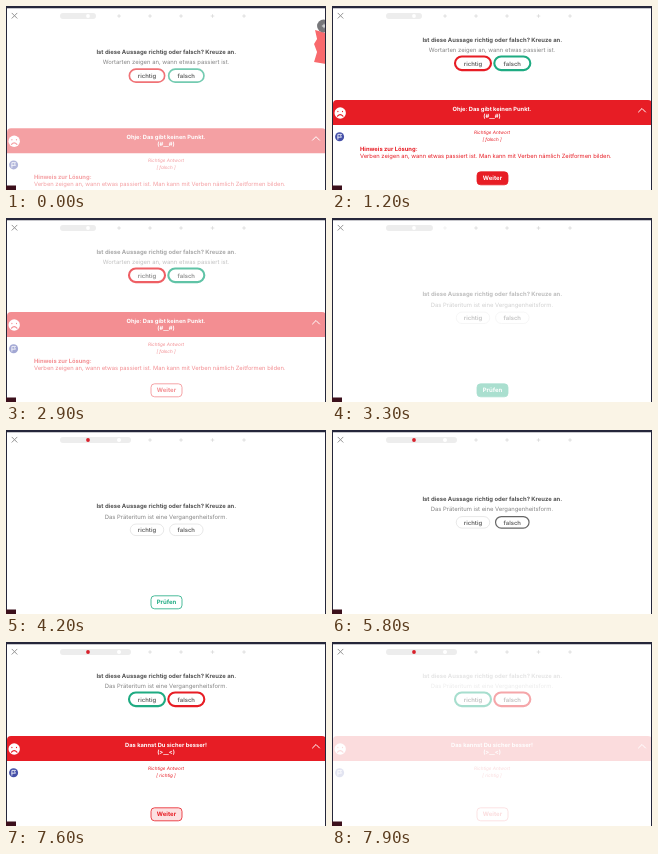
Animation of 320x184 px, one loop 8 s. Source, as an HTML page:

```html
<!DOCTYPE html>
<html lang="de">
<head>
<meta charset="utf-8">
<title>Quiz</title>
<style>
html, body { margin: 0; width: 100%; height: 100%; overflow: hidden; background: #fff; }
svg { display: block; width: 100vw; height: 100vh; }
text { font: 5.88px Inter, "Open Sans", sans-serif; text-rendering: geometricPrecision; text-anchor: middle; fill: #858585; }
.bold { font-weight: 700; font-size: 5.88px; fill: #505050; }
.label { font-weight: 600; font-size: 5.9px; fill: #626262; }
.title { font-weight: 700; font-size: 5.75px; }
.btn { font-weight: 700; font-size: 6px; }
.small { font-style: italic; font-size: 4.6px; }
.red { fill: #e71d25; }
.white { fill: #fff; }
.left { text-anchor: start; font-size: 5.8px; }
.line { fill: none; stroke-linecap: round; stroke-linejoin: round; }
</style>
</head>
<body>
<svg id="stage" viewBox="0 0 320 184"></svg>
<script>
const RED = '#e71d25', GREEN = '#1fab82', PALE = '#d8d8d8', LOOP = 8000;
const stage = document.getElementById('stage');
const $ = id => document.getElementById(id);
const set = (id, attrs) => { for (const k in attrs) $(id).setAttribute(k, attrs[k]); };
const ramp = (t, a, b) => Math.min(1, Math.max(0, (t - a) / (b - a)));
const mix = (a, b, p) => a + (b - a) * p;
const smooth = p => (1 - Math.cos(Math.PI * p)) / 2;

const text = (x, y, s, cls = '') => `<text x="${x}" y="${y}" class="${cls}">${s}</text>`;
const line = (d, color, w = 1) => `<path class="line" d="${d}" stroke="${color}" stroke-width="${w}"/>`;
const plus = (x, y, r, color) => line(`M${x - r} ${y}h${2 * r}M${x} ${y - r}v${2 * r}`, color, .8);
const button = (id, label) => `<g id="${id}">
  <rect id="${id}Box" x="145" y="165.8" width="31" height="13" rx="3.6"/>
  <text id="${id}Text" x="160.5" y="174.4" class="btn">${label}</text></g>`;
const pill = (id, x, label) => `<rect id="${id}" fill="#fff"/>` + text(x, 102, label, 'label');

const question = (n, sub) => `<g id="ask${n}">
  <g id="words${n}">${text(160.3, 78.2, 'Ist diese Aussage richtig oder falsch? Kreuze an.', 'bold')}
  ${text(160, 88.6, sub)}</g>
  <g id="pills${n}">${pill('yes' + n, 141, 'richtig')}${pill('no' + n, 180.3, 'falsch')}</g></g>`;

const panel = (n, title, face, answer, hint) => `<g id="panel${n}">
  <rect x="1" y="112" width="319" height="90" fill="#fff"/>
  <path d="M1 119V98q0-4 4-4H316q4 0 4 4V119Z" fill="${RED}"/>
  ${text(160, 105.2, title, 'title white')}${text(160, 112.2, face, 'title white')}
  <circle cx="8.2" cy="107" r="5.7" fill="#fff"/>
  ${line('M5.5 110.2q2.7-3 5.4 0M5.9 105.4v.2M10.5 105.4v.2', RED, 1.2)}
  ${line('M306.5 106l3.5-3.5 3.5 3.5', '#fff')}
  <circle cx="7.6" cy="130.7" r="4.5" fill="#4550a8"/>
  ${line('M5.9 133.2v-4.8h3.6l-1 1.4 1 1.4h-3.6', '#fff', .8)}
  ${text(160, 127.5, 'Richtige Antwort', 'small red')}${text(160, 134.5, `[ ${answer} ]`, 'small red')}
  ${hint ? text(28, 144.7, 'Hinweis zur Lösung:', 'title red left') + text(28, 152, hint, 'red left') : ''}
  ${button('next' + n, 'Weiter')}</g>`;

stage.innerHTML = `<rect width="320" height="184" fill="#fff"/>
  ${line('M6 7.2l5 5M11 7.2l-5 5', '#959595', 1)}
  <rect id="bar" x="54" y="7" height="6" rx="3" fill="#ededed"/>
  <circle id="dot" cx="82" cy="10" r="1.9"/>
  <g id="plus">${plus(113, 10, 1.4, PALE)}</g><circle id="nextDot" cx="113" cy="10" r="2" fill="#fff"/>
  ${[144, 175, 206.5, 238].map(x => plus(x, 10, 1.4, PALE)).join('')}
  ${question(1, 'Wortarten zeigen an, wann etwas passiert ist.')}
  ${question(2, 'Das Präteritum ist eine Vergangenheitsform.')}
  ${button('check', 'Prüfen')}
  ${panel(1, 'Ohje: Das gibt keinen Punkt.', '(#__#)', 'falsch',
    'Verben zeigen an, wann etwas passiert ist. Man kann mit Verben nämlich Zeitformen bilden.')}
  ${panel(2, 'Das kannst Du sicher besser!', '(&gt;__&lt;)', 'richtig')}
  <g id="helper"><path d="M309 24l11 3v31l-12-2 3-10-3-8 3-5Z" fill="#f8696c"/>
  <circle cx="317.5" cy="20" r="6.5" fill="#77777a"/>${plus(318, 20, 1.8, '#fff')}</g>
  <path d="M0 0H320V184H319V2.3H1V184H0Z" fill="#25263a"/>
  <rect y="179.5" width="10" height="4.5" fill="#3c101c"/>`;

function drawPill(id, cx, grow, color, width, alpha) {
  const w = mix(33.5, 36, grow), h = mix(11.5, 13.6, grow);
  set(id, {
    x: cx - w / 2, y: 99.8 - h / 2, width: w, height: h, rx: h / 2,
    stroke: color, 'stroke-width': width, 'stroke-opacity': alpha
  });
}

function drawButton(id, color, fill, alpha) {
  set(id, { opacity: alpha });
  set(id + 'Box', { fill: color, 'fill-opacity': fill, stroke: color, 'stroke-width': .8 });
  set(id + 'Text', { style: `fill:${fill > .5 ? '#fff' : color}` });
}

// Slides the question up and the feedback panel in from below.
function drawScene(n, t, show, start, hover, leave, picked) {
  const age = t - start, p = smooth(ramp(age, 0, 160));
  const fade = 1 - ramp(t, leave, leave + 260);
  set('ask' + n, { transform: `translate(0 ${-42.5 * p})`, opacity: show });
  set('words' + n, { opacity: fade });
  set('pills' + n, { opacity: Math.sqrt(fade) });
  if (age > 60) {
    const colors = n === 1 ? [RED, GREEN] : [GREEN, RED];
    const edge = mix(.6, 2.1, p), alpha = ramp(age, 40, 140);
    drawPill('yes' + n, 141, p, colors[0], edge, alpha);
    drawPill('no' + n, 180.3, p, colors[1], edge, alpha);
  } else {
    drawPill('yes' + n, 141, 0, PALE, .6, 1);
    drawPill('no' + n, 180.3, 0, picked ? '#666' : PALE, mix(.6, 1.2, picked), 1);
  }
  set('panel' + n, { transform: `translate(0 ${97 * (1 - p)})`, opacity: show * ramp(age, 75, 140) * fade });
  const fill = ramp(t, hover, hover + 150) * (1 - ramp(t, leave - 200, leave - 60));
  drawButton('next' + n, RED, fill, ramp(age, 150, 300));
}

function draw(now) {
  const t = now % LOOP;
  const enter = ramp(t, 3150, 3550);
  drawScene(1, t, t < 3100 ? 1 : 0, -101, 1000, 2770, 0);
  drawScene(2, t, enter, 5757, 6980, 7680, ramp(t, 4650, 4800));

  const fill = 1 - ramp(t, 4050, 4190) + ramp(t, 5150, 5300);
  drawButton('check', GREEN, fill, t < 5760 ? enter : 0);

  set('bar', { width: mix(36, 71, smooth(enter)) });
  set('dot', { fill: enter > .4 ? '#d8202b' : '#fff' });
  set('plus', { opacity: 1 - enter });
  set('nextDot', { opacity: enter });
  set('helper', { transform: `translate(${18 * ramp(t, 0, 400)} 0)`, opacity: t < 500 ? 1 : 0 });
  requestAnimationFrame(draw);
}
draw(0);
</script>
</body>
</html>
```
